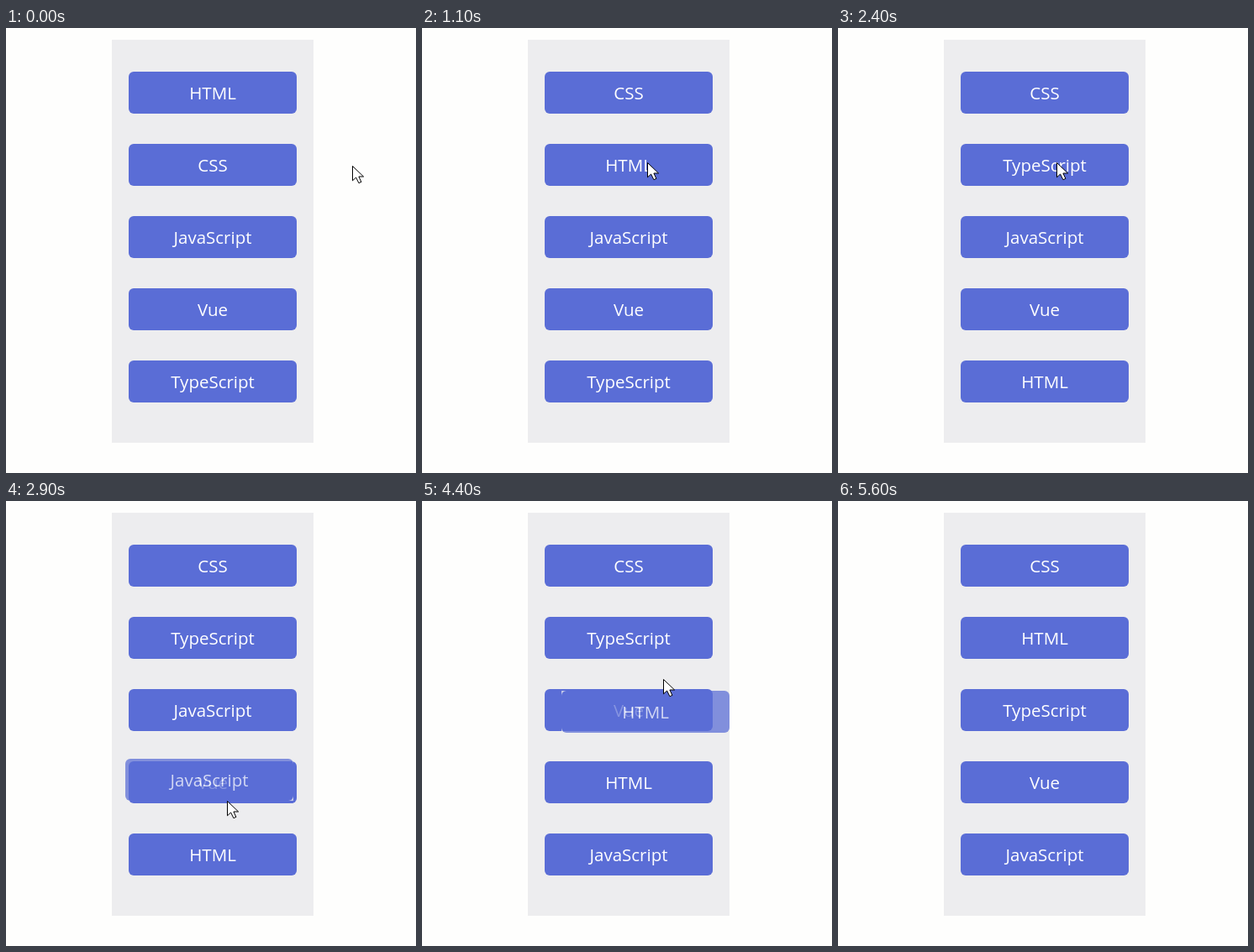
Animation of 488 by 530 pixels, one loop 5900 ms. Source, as an HTML page:

```html
<!DOCTYPE html>
<html lang="en">
<head>
<meta charset="utf-8">
<title>Drag to sort</title>
<style>
  :root { --panel: #ededef; }
  html, body { margin: 0; width: 100%; height: 100%; overflow: hidden; background: #fefefd; }
  #list { position: absolute; left: 126px; top: 14px; width: 240px; height: 480px; background: var(--panel); }
  .item {
    position: absolute; width: 200px; height: 50px; border-radius: 6px;
    background: #5a6dd6; color: #fff; text-align: center;
    font: 500 20.5px/50px "Open Sans", "Noto Sans", sans-serif;
  }
  #ghost { position: absolute; left: 0; top: 0; width: 200px; height: 50px; background: var(--panel); opacity: .73; }
  #cursor { position: absolute; left: 0; top: 0; }
</style>
</head>
<body>
<div id="list"></div>
<div id="ghost"><div class="item"></div></div>
<svg id="cursor" width="15" height="22">
  <path d="M.5 .5V17.8L4.6 14L7.9 20.7L10.9 19.4L7.9 13H13.6Z" fill="#fff" stroke="#000"/>
</svg>
<script>
const LOOP = 5900, STEP = 100, HIDE = 5600;
const LEFT = 146, TOP = 52, PITCH = 86;
const LAG = 64; // the ghost trails the pointer
const names = ['HTML', 'CSS', 'JavaScript', 'Vue', 'TypeScript'];
const home = [412, 164];

// Pointer legs: start, end, x, y, sideways bow, time of drop when dragging
const legs = [
  [0, 300, 270, 74],
  [400, 800, 288, 176, 8, 800],
  [800, 900, 284, 258],
  [900, 1100, 268, 160],
  [1100, 1420, 265, 420, 20, 1500],
  [1500, 1800, 267, 326],
  [2000, 2400, 260, 160, 24, 2400],
  [2400, 2700, 265, 244],
  [2700, 3200, 272, 420, -7, 3300],
  [3300, 3500, 316, 478],
  [3800, 4200, 268, 326],
  [4200, 4700, 273, 148, 18, 4900],
  [5200, 5500, 254, 430]
].map(([start, end, x, y, bow = 0, drop = 0], i, all) => {
  const from = i ? all[i - 1].slice(2, 4) : home;
  return { start, end, from, to: [x, y], bow, drop };
});

const list = document.getElementById('list');
const ghost = document.getElementById('ghost');
const cursor = document.getElementById('cursor');
const items = names.map((_, i) => {
  const el = document.createElement('div');
  el.className = 'item';
  el.style.left = '20px';
  el.style.top = 38 + PITCH * i + 'px';
  return list.appendChild(el);
});

const slotAt = y => Math.floor((y - 38) / PITCH);

function progress(leg, t) {
  const u = Math.min(1, Math.max(0, (t - leg.start) / (leg.end - leg.start)));
  return 1 - (1 - u) ** 2;
}

function along({ from, to, bow }, p) {
  return [
    from[0] + (to[0] - from[0]) * p + bow * Math.sin(Math.PI * p),
    from[1] + (to[1] - from[1]) * p
  ];
}

function place(el, x, y) {
  el.style.transform = `translate(${Math.round(x)}px, ${Math.round(y)}px)`;
}

function draw(t) {
  const order = names.slice();
  let pos = home, held = false;
  for (const leg of legs.filter(l => l.start <= t)) {
    const { from, to, drop } = leg;
    const slot = slotAt(from[1]);
    pos = along(leg, progress(leg, t));
    if (!drop) continue;
    if (t >= drop) {
      order.splice(slotAt(to[1]), 0, order.splice(slot, 1)[0]);
      continue;
    }
    const p = progress(leg, t - LAG);
    held = p > .4;
    const [x, y] = along(leg, p);
    place(ghost, x - from[0] + LEFT, y - from[1] + TOP + PITCH * slot);
    ghost.firstChild.textContent = order[slot];
  }
  items.forEach((el, i) => el.textContent = order[i]);
  ghost.style.display = held ? '' : 'none';
  place(cursor, ...pos);
  cursor.style.display = t < HIDE ? '' : 'none';
}

const start = performance.now();
function tick() {
  const t = (performance.now() - start) % LOOP;
  draw(Math.floor(t / STEP) * STEP);
  requestAnimationFrame(tick);
}
tick();
</script>
</body>
</html>
```
